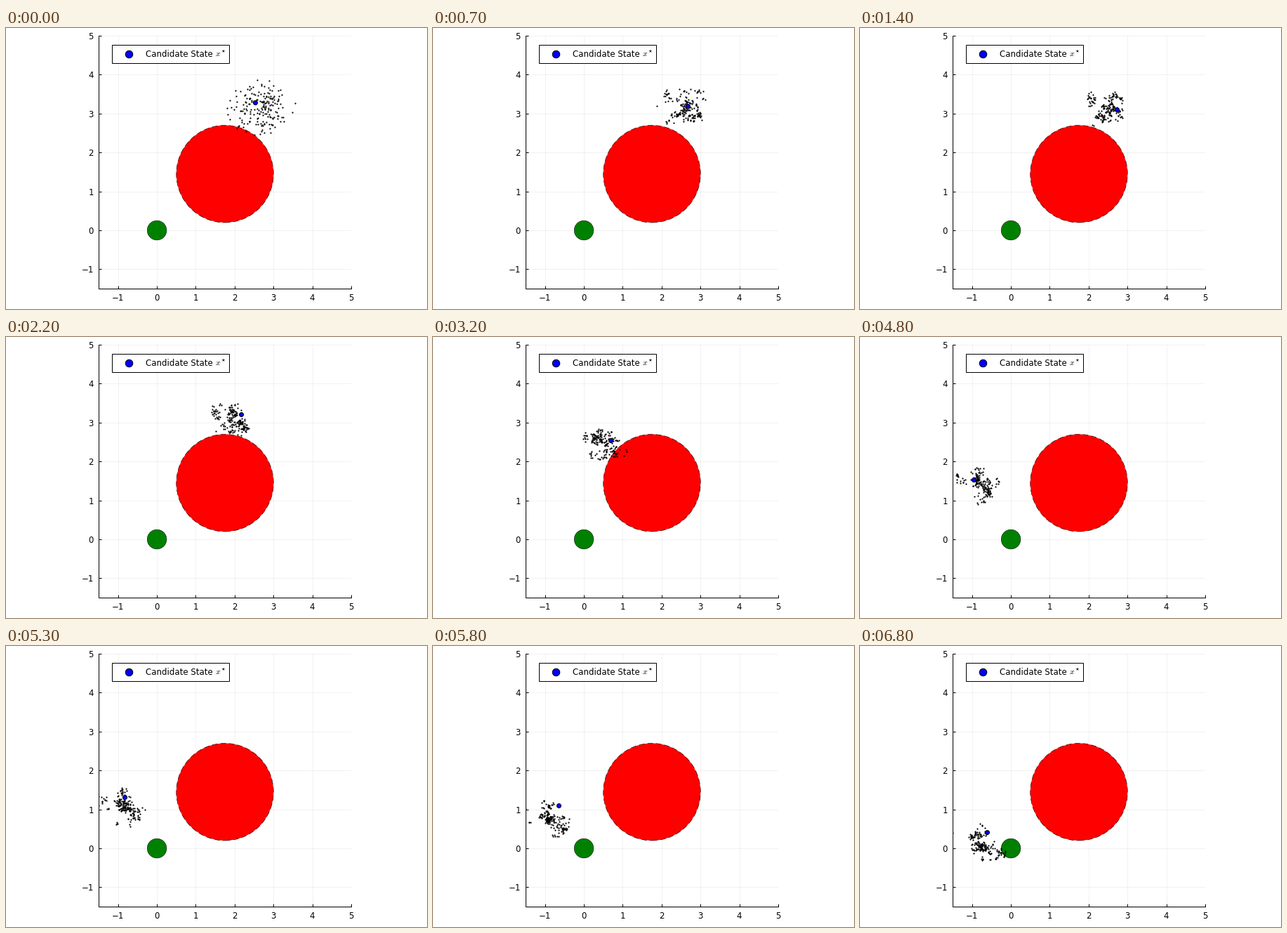
Write a matplotlib script that moves like this. It is 600 px wide and 400 px high and loops after 6900 ms.

```python
import matplotlib.pyplot as plt
import numpy as np
from matplotlib.animation import FuncAnimation
from matplotlib.patches import Circle, Rectangle

W, H, DPI = 600, 400, 100
FRAMES, STEP = 69, 100
N = 190
PX = 72 / DPI  # one pixel in points

plt.rcParams.update({"font.family": "DejaVu Sans", "font.size": 8.5})

# Candidate's key positions: step, x, y
CANDIDATE = np.array([
    (0, 2.53, 3.28), (14, 2.72, 3.10), (22, 2.16, 3.22), (32, 0.68, 2.54),
    (48, -0.95, 1.54), (58, -0.66, 1.11), (68, -0.615, 0.415),
])


def mean_at(k):
    """Cloud centre: drifts left over the obstacle, then down to the goal."""
    x = -0.92 + 3.6 / (1 + np.exp((k - 29.5) / 5.5)) + 0.2 * (k / 68) ** 8
    y = 3.15 - 0.1 * np.log1p(np.exp((k - 22) / 1.5))
    return np.stack([x, y], axis=-1)


def spread_at(k):
    return np.array([0.23, 0.20]) + 0.11 * np.exp(-k / 5)


def simulate(seed=7):
    """Particle cloud per step: resample, jitter, rescale around the path."""
    rng = np.random.default_rng(seed)
    radius = np.sqrt(-2 * np.log(rng.uniform(0.1, 1, N)))
    angle = rng.uniform(0, 2 * np.pi, N)
    unit = np.column_stack([radius * np.cos(angle), radius * np.sin(angle)])
    clouds = []
    for k in range(FRAMES):
        unit = (unit - unit.mean(axis=0)) / unit.std(axis=0)
        clouds.append(mean_at(k) + spread_at(k) * unit)
        unit = unit[rng.integers(N, size=N)] + rng.normal(0, 0.13, (N, 2))
    return clouds


def lead_path():
    """Candidate per step, its offset from the centre interpolated."""
    steps = np.arange(FRAMES)
    keys = CANDIDATE[:, 0]
    offsets = CANDIDATE[:, 1:] - mean_at(keys)
    shift = [np.interp(steps, keys, column) for column in offsets.T]
    return mean_at(steps) + np.column_stack(shift)


CLOUDS, LEAD = simulate(), lead_path()

fig = plt.figure(figsize=(W / DPI, H / DPI), dpi=DPI, facecolor="white")

ax = fig.add_axes([132 / W, 28.9 / H, 360 / W, 360 / H])
ax.set(xlim=(-1.5, 5), ylim=(-1.5, 5), xticks=range(-1, 6), yticks=range(-1, 6))
ax.spines[["top", "right"]].set_visible(False)
ax.spines[["left", "bottom"]].set_linewidth(PX)
ax.tick_params(direction="in", length=4 * PX, width=PX, pad=7 * PX)
ax.grid(color="black", alpha=0.1, linewidth=0.5 * PX)
ax.set_axisbelow(True)

ax.add_patch(Circle((1.75, 1.45), 1.25, fc="red", ec="black", lw=0.6 * PX,
                    ls=(0, (13, 7)), zorder=2))
ax.add_patch(Circle((0, 0), 0.25, fc="green", ec="black", lw=0.5 * PX, zorder=2))

dots, = ax.plot([], [], "o", ms=2.2 * PX, color="black", mew=0, zorder=3)
star, = ax.plot([], [], "o", ms=6 * PX, mfc="blue", mec="black", mew=PX, zorder=4)

# Legend, laid out in pixels
key = fig.add_axes([0, 0, 1, 1])
key.set(xlim=(0, W), ylim=(H, 0))
key.axis("off")
key.add_patch(Rectangle((150.5, 23.5), 167, 26, fc="white", ec="black", lw=PX))
key.plot(175, 36.5, "o", ms=10.5 * PX, mfc="blue", mec="black", mew=PX)
key.text(199, 40.7, "Candidate State", va="baseline")
key.text(297.5, 40.7, r"$x^\star$", va="baseline", math_fontfamily="cm")


def update(k):
    dots.set_data(*CLOUDS[k].T)
    star.set_data(*LEAD[[k]].T)
    return dots, star


anim = FuncAnimation(fig, update, frames=FRAMES, interval=STEP,
                     repeat=True, repeat_delay=0)
plt.show()
```
